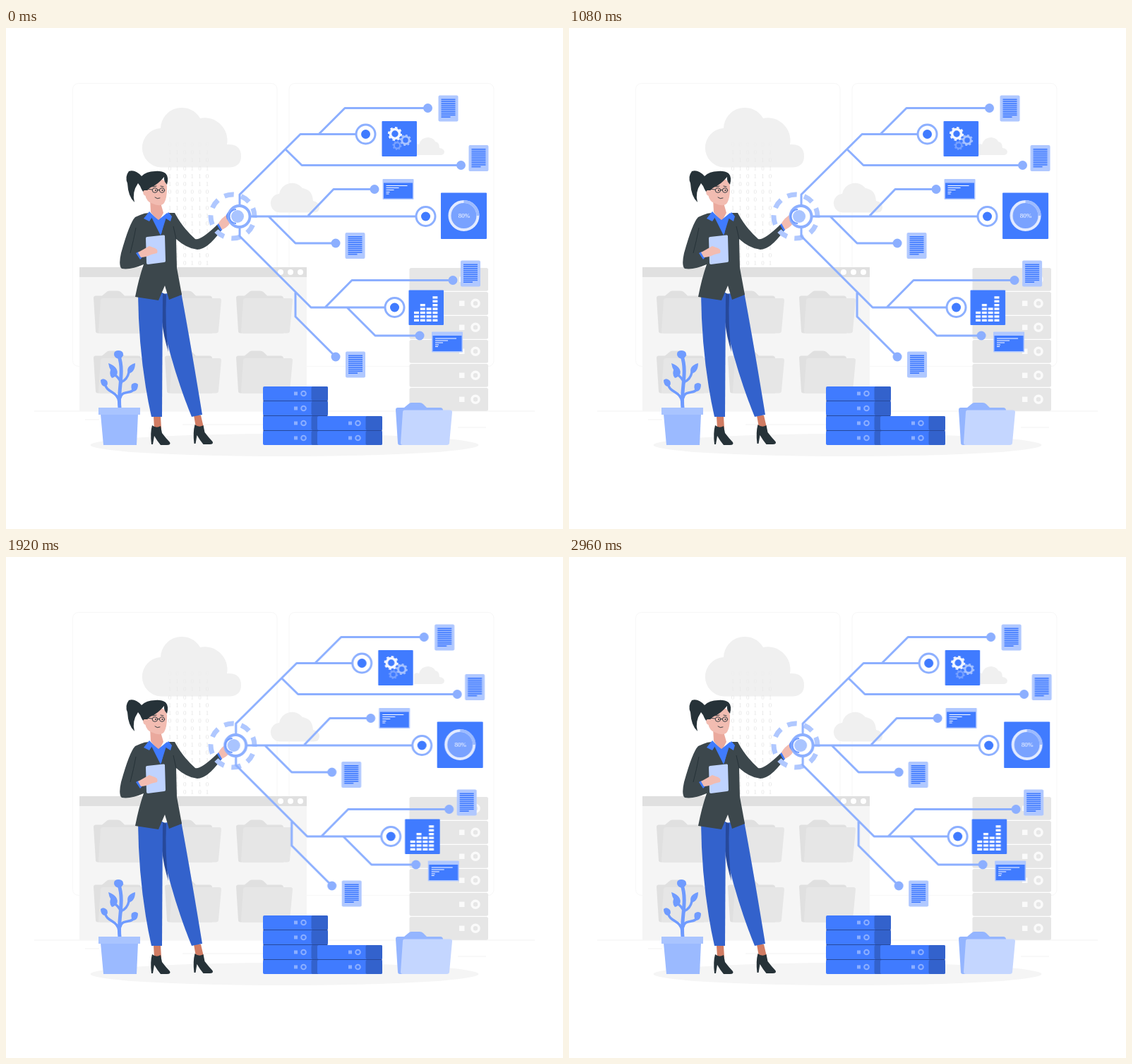
Animation, 789 px wide and 710 px high, one loop 3 s. Source, as an HTML page:

```html
<!DOCTYPE html>
<html lang="en">
<head>
<meta charset="utf-8">
<title>Data network</title>
<style>
html, body { margin: 0; width: 100%; height: 100%; overflow: hidden; background: #fff; }
svg { display: block; width: 789px; height: 710px; }
.link { fill: none; stroke: #8cafff; stroke-width: 3; stroke-linejoin: round; }
.bits { font: 9px "Liberation Serif", Times, serif; fill: #e4e4e4; text-anchor: middle; }
.percent { font: 9px "Liberation Serif", Times, serif; fill: #fff; text-anchor: middle; }
#tree { animation: shake 1.5s linear -30ms infinite; }
@keyframes shake {
  0%, 100% { transform: translateX(0); }
  10%, 90% { transform: translateX(-1.42px); }
  20%, 80% { transform: translateX(2.84px); }
  30%, 50%, 70% { transform: translateX(-5.68px); }
  40%, 60% { transform: translateX(5.68px); }
}
</style>
</head>
<body>
<svg viewBox="0 0 789 710">
  <defs>
    <g id="folderBack"><path d="M0 10q0-3 3-3h9l6-5q2-2 4-2h12q3 0 5 2l5 5h19q4 0 4 4v49H6q-3 0-3-3z"/></g>
    <g id="folderFront"><path d="M13 10.500h64q3 0 3 3l-4 43.500q0 3-4 3H10q-3 0-3-3l3-43.500q0-3 3-3z"/></g>
    <g id="doc"></g>
    <g id="panel">
      <rect width="44" height="29" rx="1" fill="#b0c8ff"/>
      <rect x="1.5" y="5.5" width="41" height="22" fill="#407bff"/>
      <path d="M5 9.5H35M5 12.5H23M5 15.5H16M5 18.5H10M5 21H9" stroke="#fff" stroke-width="1.2"/>
    </g>
    <g id="node">
      <circle r="13.5" fill="#fff" stroke="#8cafff" stroke-width="3"/>
      <circle r="6.5" fill="#407bff"/>
    </g>
  </defs>

  <g fill="#fff" stroke="#f7f7f7">
    <rect x="94.5" y="78.5" width="289.5" height="401" rx="8"/>
    <rect x="401" y="78.5" width="290" height="401" rx="8"/>
    <path d="M40 543H749M112 555H132M640 566H680M250 562H364" stroke="#f3f3f3"/>
  </g>

  <g fill="#f0f0f0">
    <path d="M219 197.500A27.800 27.800 0 0 1 219 142A30 30 0 0 1 275 128A32 32 0 0 1 313 165Q333 164 333 181.500Q333 196 318 197.500z"/>
    <path d="M387 261.500A13.300 13.300 0 0 1 387 235A18.500 18.500 0 0 1 420 227Q434 229 435 245Q444 247 444 254Q444 261.500 436 261.500z"/>
    <path d="M578 180V166Q581 163 585 165Q588 155 598 155Q606 156 608 161Q614 162 614 170Q621 171 621 176Q620 180 616 180z"/>
  </g>
  <g id="bits" class="bits"></g>

  <rect x="104" y="339" width="322" height="204" fill="#f5f5f5"/>
  <path d="M104 339H426V353H104z" fill="#e0e0e0"/>
  <g fill="#fff"><circle cx="389" cy="346" r="4"/><circle cx="403" cy="346" r="4"/><circle cx="417" cy="346" r="4"/></g>
  <g id="folders"></g>
  <g id="rack"></g>
  <ellipse cx="394.500" cy="591" rx="275" ry="16" fill="#f5f5f5"/>
  <g id="servers"></g>
  <g transform="translate(552 531)"><use href="#folderBack" fill="#94b5ff"/><use href="#folderFront" fill="#c4d6ff"/></g>

  <!-- plant -->
  <g fill="none" stroke="#6f9bff" stroke-width="3.500" stroke-linecap="round">
    <path d="M161 538C158 515 168 488 160 465" stroke-width="5"/>
    <path d="M160 530C158 514 143 518 140 504M162 524C164 512 180 520 181 510M163 503Q160 495 153 491M163 502Q172 498 174 488"/>
  </g>
  <g fill="#6f9bff">
    <path d="M153 462Q153 457 160 457Q167 458 166 464Q163 470 157 468Q153 466 153 462z"/>
    <path d="M145 475Q147 489 157 492Q161 481 145 475zM183 475Q169 479 173 490Q183 488 183 475z"/>
    <path d="M134 499Q138 495 143 500Q146 507 139 508Q134 506 134 499zM148 485Q151 483 155 486Q157 495 150 496Q146 492 148 485zM178 505Q183 501 187 505Q187 514 181 515Q176 512 178 505z"/>
  </g>
  <path d="M134 547H187L185 591H138z" fill="#9bbaff"/>
  <path d="M131 538H190V548H131z" fill="#a9c4ff"/>

  <!-- woman -->
  <path d="M209 550H219L220 568H210zM266 549H276L280 566H269z" fill="#d17c63"/>
  <g fill="#263238">
    <path id="shoe" d="M207 563Q213 568 219 564L221 574Q227 582 232 587Q234 591 228 591H219Q214 585 210 578L208 590H206Q204 574 207 563z"/>
    <use href="#shoe" x="60.500" y="-1"/>
  </g>
  <path d="M221 377L248 374Q262 450 278 548L263 551Q237 487 221 415z" fill="#3362cc"/>
  <path d="M221 375L227 378Q225 420 230 459Q223 436 221 416z" fill="#27499b"/>
  <path d="M187 377L222 375L221 551H206Q188 470 187 377z" fill="#3362cc"/>

  <path d="M300 278Q306 268 314 264L320 263Q321 266 316 268L319 272Q317 281 306 286L303 289z" fill="#f2bcb1"/>
  <path d="M298 280L301 277L306 286L303 290z" fill="#407bff"/>
  <path d="M204 242L205 261L216 275L223 262L219 248z" fill="#eaa99d"/>
  <path d="M202 262L216 272L228 262L229 340H209z" fill="#407bff"/>
  <path d="M190 265Q196 262 203 262L219 294L229 262L239 262Q250 283 268 299Q275 302 299 279L304 288Q285 314 271 314Q255 312 241 299L242 340L249 378L231 385L225 365L216 386L183 381Q188 355 195 335Q177 343 164 341Q159 337 163 319Q175 276 183 268z" fill="#3c474c"/>
  <path d="M203 260L195 270L203 274L207 268L220 292L225 269L233 274L235 267L230 261L218 275z" fill="#407bff"/>
  <path d="M184 319L188 317L193 325L190 328z" fill="#407bff"/>
  <path d="M184 283Q181 300 176 319M241 299L237 281" fill="none" stroke="#263238"/>
  <path d="M200 296L223 293.500Q225 293 225 295L226 330Q226 332 224 332L201 335Q199 335 199 333L198 298Q198 296 200 296z" fill="#bfd3ff"/>
  <path d="M187 318Q196 313 203 309L211 312Q216 314 214 319L206 321Q198 325 191 325z" fill="#f2bcb1"/>

  <path d="M198 222Q201 212 217 213Q229 216 228 228Q228 241 224 248Q219 254 208 249Q199 247 197 236z" fill="#f2bcb1"/>
  <path d="M192 210Q183 200 174 203Q168 211 172 220Q173 239 182 247Q178 233 187 220L190 224Q193 232 198 236Q199 229 205 226Q215 222 224 211Q223 217 228 222Q231 211 226 206Q220 202 211 203Q199 203 192 210z" fill="#263238"/>
  <path d="M196 230Q193 231 195 236Q197 239 200 237L200 230z" fill="#f2bcb1"/>
  <g fill="none" stroke="#263238" stroke-width=".9" stroke-linecap="round">
    <ellipse cx="211" cy="230" rx="3.800" ry="3.300"/><ellipse cx="221" cy="230" rx="3.600" ry="3.300"/>
    <path d="M214.800 229.500H217.400M207 229L198 228M208 225L213 224M219 224L223 225M211 240Q214 243 218 241"/>
  </g>
  <circle cx="212" cy="230" r="1" fill="#263238"/><circle cx="221.500" cy="230" r="1" fill="#263238"/>

  <circle cx="321" cy="267" r="31" fill="none" stroke="#b0c8ff" stroke-width="7" pathLength="800" stroke-dasharray="56 44" transform="rotate(-22 321 267)"/>
  <circle cx="321" cy="267" r="9" fill="#5588ff"/>

  <g transform="translate(.25)"><g id="tree">
    <path class="link" d="M331 252V236L417 150.500H497M443 150.500L480 113.500H597M396 172L419 194.500H644M345 267H581M428 266L464 228.500H522M372 267L410 305H467M331 282V295L432 396H537M452 396L490 357.500H633M483 396L523 436H586M410 375V409L467 466"/>
    <circle cx="330.500" cy="267" r="15" fill="#fff" stroke="#8cafff" stroke-width="4"/>
    <circle cx="328" cy="267" r="9" fill="#a9c4ff"/>
    <path d="M326 257A10 10 0 0 0 326 277" fill="none" stroke="#6f9bff" stroke-width="2"/>
    <g id="ends" fill="#8cafff"></g>
    <use href="#node" x="509.500" y="150.500"/><use href="#node" x="594.500" y="267"/><use href="#node" x="550.500" y="396"/>
    <g id="docs"></g>
    <use href="#panel" x="533.500" y="214"/><use href="#panel" x="603" y="430.500"/>
    <g fill="#407bff">
      <rect x="532.500" y="132" width="49.500" height="50" rx="1"/>
      <rect x="616" y="233.500" width="65" height="65.500" rx="1"/>
      <rect x="570.500" y="371.500" width="49.500" height="49.500" rx="1"/>
    </g>
    <g id="gears" fill="none"></g>
    <circle cx="648.500" cy="266" r="20" fill="#79a2ff" stroke="#e3ebff" stroke-width="4"/>
    <path d="M648.500 246A20 20 0 0 1 668.500 266" fill="none" stroke="#9dbbff" stroke-width="4"/>
    <text class="percent" x="649" y="269">80%</text>
    <g id="bars"></g>
  </g></g>
</svg>
<script>
const put = (id, parts) => { document.getElementById(id).innerHTML = parts.join(""); };
const range = n => [...Array(n).keys()];
const box = (x, y, w, h, fill, r = 0) => `<rect x="${x}" y="${y}" width="${w}" height="${h}" rx="${r}" fill="${fill}"/>`;
const ring = (x, y, r, width, color, extra = "") =>
  `<circle cx="${x}" cy="${y}" r="${r}" fill="none" stroke="${color}" stroke-width="${width}" ${extra}/>`;

put("bits", range(6).flatMap(c => range(16).map(r =>
  `<text x="${232 + c * 10.6}" y="${168 + r * 11.2}" opacity="${Math.min(1, .25 + r * .2)}">${(r * 5 + c * 3 + (r * c >> 1)) % 3 ? 1 : 0}</text>`)));

put("folders", range(6).map(i =>
  `<g transform="translate(${124 + i % 3 * 101} ${i < 3 ? 372.5 : 457.5})"><use href="#folderBack" fill="#e0e0e0"/><use href="#folderFront" fill="#e6e6e6"/></g>`));

put("rack", range(6).map(i => {
  const y = 340 + i * 34;
  return box(571.5, y, 111.5, 32.7, "#e6e6e6", 2.5) + box(642, y + 12.5, 7.5, 7.5, "#fafafa") + ring(665, y + 16.3, 5, 3.5, "#fafafa");
}));

const server = (x, y) => box(x, y, 92, 20, "#407bff", 2) + box(x + 68.5, y, 23.5, 20, "#3362cc", 2)
  + box(x + 44, y + 7.5, 5, 5, "#8cafff") + ring(x + 57.5, y + 10, 3.3, 2, "#8cafff");
put("servers", [
  box(364.5, 527, 91, 3, "#27499b"), box(364.5, 548, 91, 3, "#27499b"), box(364.5, 569, 168, 3, "#27499b"),
  ...range(4).map(i => server(364, 508 + i * 21)),
  ...range(2).map(i => server(441, 550 + i * 21))
]);

put("doc", [box(0, 0, 28, 37, "#b0c8ff", 2),
  ...range(10).map(i => box(4, 5 + i * 2.75, i < 9 ? 20 : 13, 1.7, "#407bff"))]);
put("docs", [[612.5, 95.5], [655.5, 166], [480.5, 290], [644, 329.5], [481, 458.5]]
  .map(([x, y]) => `<use href="#doc" x="${x}" y="${y}"/>`));
put("ends", [[597.5, 113.5], [644.5, 194.5], [522, 228.5], [467, 305], [633, 357.5], [586, 436], [467, 466]]
  .map(([x, y]) => `<circle cx="${x}" cy="${y}" r="6.5"/>`));

const gear = (x, y, r, color) => ring(x, y, r * .65, r * .36, color)
  + ring(x, y, r * .9, r * .22, color, 'pathLength="16" stroke-dasharray="1 1"');
put("gears", [gear(551, 150, 10, "#f5f8ff"), gear(566, 159, 8, "#a9c4ff"), gear(554, 166.5, 6.5, "#79a2ff")]);

put("bars", [3, 5, 4, 7].flatMap((n, c) => range(n).map(i =>
  box(578 + c * 8.8, 412.6 - i * 5.4, 7, 3.4, "#f5f8ff"))));
</script>
</body>
</html>
```
